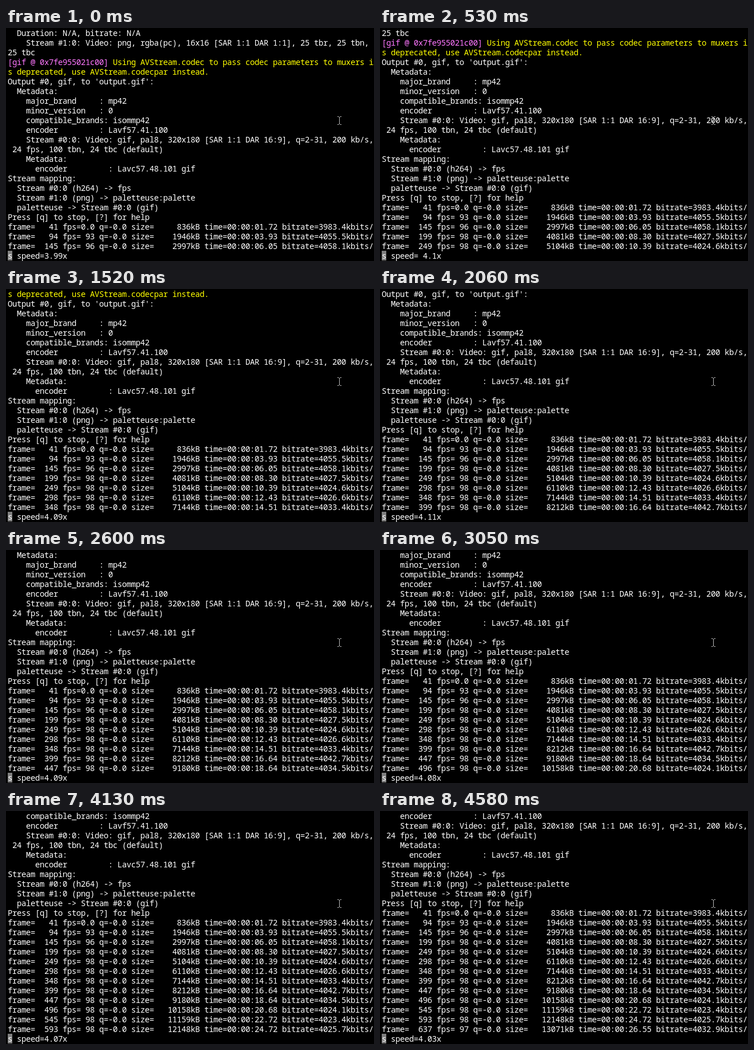
These frames come from a looping animation (644 by 409 pixels, 4930 ms). An HTML page:

```html
<!DOCTYPE html>
<html lang="en">
<head>
<meta charset="utf-8">
<title>Terminal encode</title>
<style>
html, body { margin: 0; width: 100%; height: 100%; overflow: hidden; background: #000; }
pre {
  position: absolute; left: 3px; top: 0; margin: 0; color: #fff;
  font: 14px/17px "Noto Sans Mono", monospace;
  letter-spacing: calc(8px - 1ch); /* 8px terminal cells */
}
.tag { color: #ff77ff; }
.warn { color: #ffff00; }
.block { display: inline-block; background: #7f7f7f; }
svg { position: absolute; left: 578px; top: 153px; }
</style>
</head>
<body>
<pre id="term"></pre>
<svg width="12" height="20" fill="none" stroke="#bbb">
  <path d="M2 2.5H4L5.5 4L7 2.5H9M5.5 4V15M2 16.5H4L5.5 15L7 16.5H9"/>
</svg>
<script>
const COLS = 80, VISIBLE = 23, LOOP = 4930;
const header = `  Duration: N/A, bitrate: N/A
    Stream #1:0: Video: png, rgba(pc), 16x16 [SAR 1:1 DAR 1:1], 25 tbr, 25 tbn, 25 tbc
[gif @ 0x7fe955021c00] Using AVStream.codec to pass codec parameters to muxers is deprecated, use AVStream.codecpar instead.
Output #0, gif, to 'output.gif':
  Metadata:
    major_brand     : mp42
    minor_version   : 0
    compatible_brands: isommp42
    encoder         : Lavf57.41.100
    Stream #0:0: Video: gif, pal8, 320x180 [SAR 1:1 DAR 16:9], q=2-31, 200 kb/s, 24 fps, 100 tbn, 24 tbc (default)
    Metadata:
      encoder         : Lavc57.48.101 gif
Stream mapping:
  Stream #0:0 (h264) -> fps
  Stream #1:0 (png) -> paletteuse:palette
  paletteuse -> Stream #0:0 (gif)
Press [q] to stop, [?] for help`;

// Frame count and kbit/s of each report; the other counters follow from these.
const frames = [41, 94, 145, 199, 249, 298, 348, 399, 447, 496, 545, 593, 637];
const rates = [3983.4, 4055.5, 4058.1, 4027.5, 4024.6, 4026.6, 4033.4,
  4042.7, 4034.5, 4024.1, 4023.4, 4025.7, 4032.92];

const pad = (v, n) => String(v).padStart(n);
const wrap = line => line.match(new RegExp(`.{1,${COLS}}`, "g"));
const span = (cls, s) => `<span class="${cls}">${s}</span>`;
const videoTime = i => Math.round((frames[i] / 24 + 0.0125) * 100) / 100;
const elapsed = i => 0.507 * (i + 1) - 0.0035;
const speed = i => pad(Number((videoTime(i) / elapsed(i)).toPrecision(3)), 4);

function report(frame, i) {
  const time = videoTime(i), wall = elapsed(i);
  const fps = wall > 1 ? Math.round(frame / wall) : "0.0";
  const size = Math.round(rates[i] * time / 8.192);
  return `frame=${pad(frame, 5)} fps=${pad(fps, 3)} q=-0.0 size=${pad(size, 8)}kB ` +
    `time=00:00:${time.toFixed(2).padStart(5, "0")} bitrate=${rates[i].toFixed(1)}kbits/`;
}

function paint(row) {
  if (row.startsWith("[gif")) return span("tag", row.slice(0, 22)) + span("warn", row.slice(22));
  return row.startsWith("s dep") ? span("warn", row) : row.replace(/>/g, "&gt;");
}

const head = header.split("\n").flatMap(wrap);
const rows = [...head, ...frames.map(report)].map(paint);
const steps = rows.length - VISIBLE + 1;
const firstReport = VISIBLE - head.length - 1;

// Reports come about every 510 ms, seen on a 90 ms refresh.
const startOf = k => k && Math.max(90, 90 * Math.floor((17 * k - 15) / 3) - 10);

const term = document.getElementById("term");
let shown = -1;

function draw(t) {
  let step = 0;
  while (step < steps - 1 && startOf(step + 1) <= t) step++;
  if (step === shown) return;
  shown = step;
  const last = `${span("block", "s")} speed=${speed(step + firstReport)}x`;
  term.innerHTML = [...rows.slice(step, step + VISIBLE), last].join("\n");
}

const origin = performance.now();
function tick() {
  draw((performance.now() - origin) % LOOP);
  requestAnimationFrame(tick);
}
tick();
</script>
</body>
</html>
```
